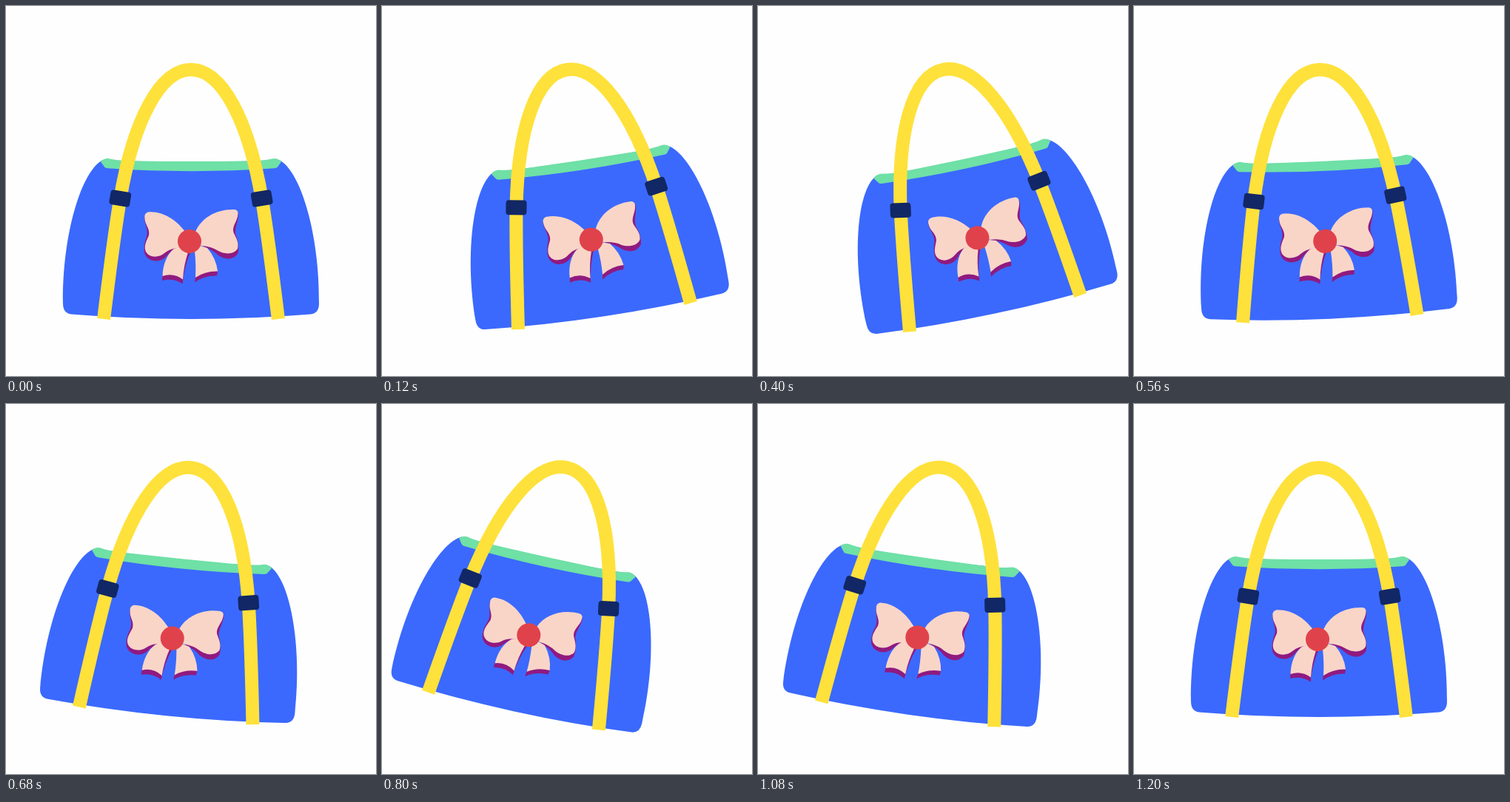
These frames come from a looping animation (500 by 500 pixels, 1240 ms). An HTML page without scripts:

```html
<!DOCTYPE html>
<html lang="en">
<head>
<meta charset="utf-8">
<title>Swinging handbag</title>
<style>
  /* Tick counter, zero where the bag passes through the vertical */
  @property --tick {
    syntax: "<number>";
    inherits: true;
    initial-value: -14.9;
  }

  html, body { margin: 0; width: 100%; height: 100%; overflow: hidden; background: #fefefe; }
  svg { display: block; width: 100%; height: 100%; }

  .bag {
    /* --pass: eased sweep between extremes; --rest: distance from an extreme towards rest */
    --pass: clamp(-1, var(--tick) / 8, 1);
    --rest: clamp(0, (max(var(--tick), -1 * var(--tick)) - 8) / 6.9, 1);
    --sweep: calc(var(--pass) * (3 - var(--pass) * var(--pass)) / 2);
    --reach: calc(1 - var(--rest) * (1 + 6 * var(--rest) - 2 * var(--rest) * var(--rest)) / 5);
    transform-origin: 250px 86.5px;
    transform: rotate(calc(15deg * var(--sweep) * var(--reach)));
    animation: swing 1240ms steps(31) -4ms infinite;
  }
  @keyframes swing {
    from { --tick: -14.9; }
    to { --tick: 16.1; }
  }

  .body { fill: #3b69fd; }
  .lining { fill: #6fe0a6; }
  .strap { fill: none; stroke: #ffe13b; stroke-width: 18; }
  .clip { fill: #122765; }
  .shade { fill: #901a80; }
  .ribbon { fill: #f9d5c8; }
  .knot { fill: #e0424b; }
</style>
</head>
<body>
<svg viewBox="0 0 500 500">
  <g class="bag">
    <path class="body" d="M131 208 C102 222 76 309 77 402 Q77 415 88 416.500 Q168 423 250 423 T412 416.500 Q423 415 423 402 C424 309 398 222 369 208 Q250 214 131 208Z"/>
    <path class="lining" d="M128 210.500 Q131 206 138 206 Q152 209.500 180 209.500 Q250 210.500 320 209.500 Q348 209.500 362 206 Q369 206 372 210.500 L367 217.500 Q366 219 363 219.300 Q250 227 137 219.300 Q134 219 133 217.500Z"/>
    <path class="strap" d="M132.100 423 C138.600 370 147 305 154 262 C172 155 208 86 250 86 S328 155 346 262 C353 305 361.400 370 367.900 423"/>
    <rect class="clip" x="-14" y="-10" width="28" height="20" rx="4" transform="translate(154.300 260) rotate(9.500)"/>
    <rect class="clip" x="-14" y="-10" width="28" height="20" rx="4" transform="translate(345.700 260) rotate(-9.500)"/>

    <g class="shade">
      <path d="M187 285 C187 296 193 302 190 312 C186 322 186 331 188 336 C193 346 208 348 217 338 Q221 332 230 328 L210 300Z"/>
      <path d="M314 279 C315 290 309 298 310 308 C314 318 315 327 313.500 334 C307 344 296 343 287 337 Q279 329 266 325 L290 300Z"/>
      <path d="M211.500 364 L211 371 Q227 367 238.500 375.500 Q241 352 249 333 L232 332Z"/>
      <path d="M256 366 L255 373.500 Q268 364 285 364.500 L286 359 L268 345Z"/>
    </g>
    <g class="ribbon">
      <path d="M242 305 C230 289 212 277 192 278.500 Q186 280 187.500 288 C188 296 195 301 193 310 C189 319 186 325 189 332 C194 341 207 340 214 334 Q221 328 232 327 L246 320Z"/>
      <path d="M256 305 C264 286 285 274 309 275 Q314 276 313.500 281 C313 291 305 297 307.500 306 C311 314 315 319 313 328 C307 337 294 335 287 331 Q278 325 264 324 L252 318Z"/>
      <path d="M227 328 C217 336 212 350 211.500 365 Q226 360 239 369.500 Q240 351 246 333 L246 322Z"/>
      <path d="M255 331 Q257 350 256 367 Q269 358 286 358.500 Q284 341 272 327 L256 322Z"/>
    </g>
    <circle class="knot" cx="248" cy="318" r="16"/>
  </g>
</svg>
</body>
</html>
```
